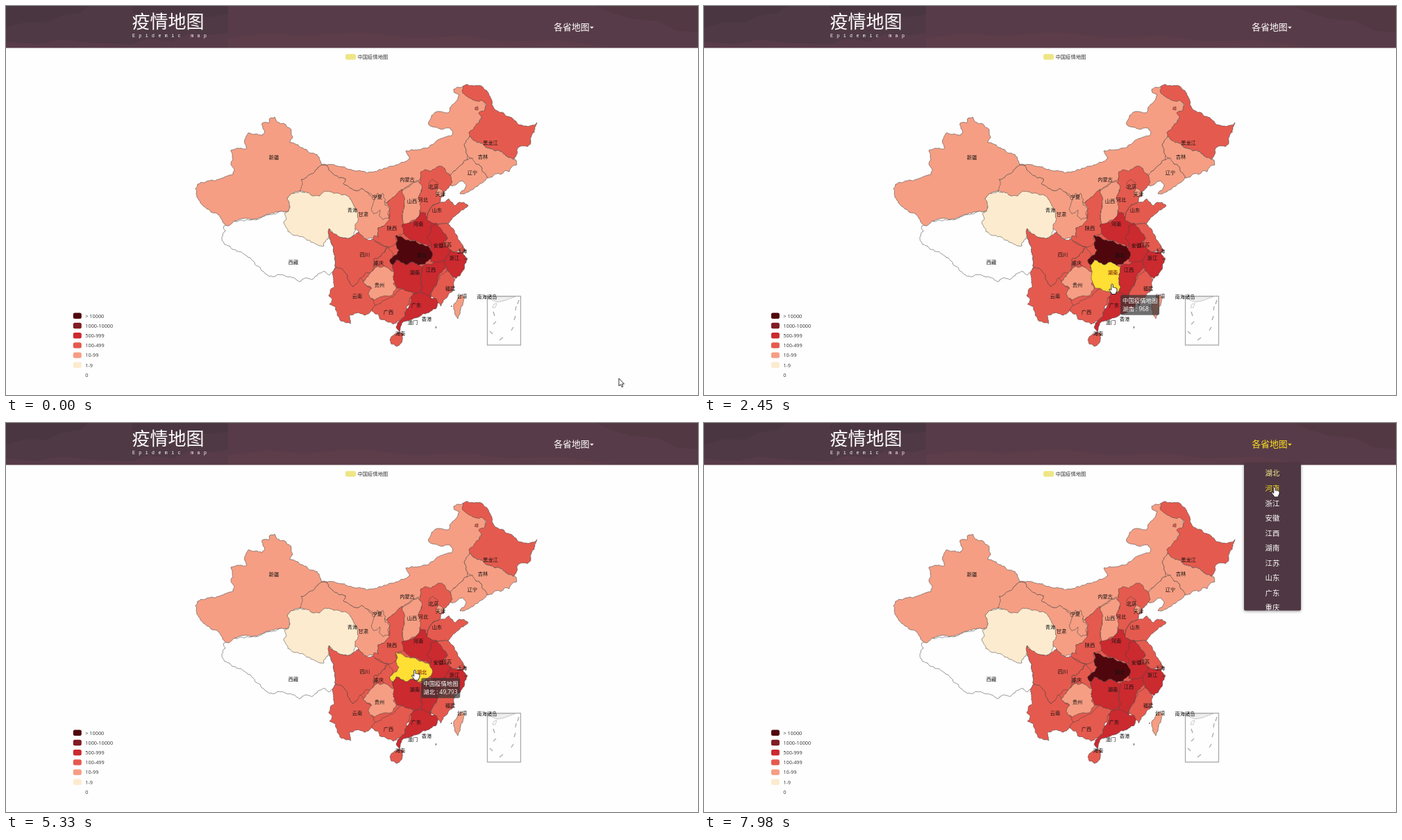
These frames come from a looping animation (997 px wide and 561 px high, 8 s). An HTML page:

```html
<!DOCTYPE html>
<html lang="zh-CN">
<head>
<meta charset="utf-8">
<title>疫情地图</title>
<style>
html, body { margin: 0; width: 100%; height: 100%; overflow: hidden; background: #fefefe; }
svg { display: block; width: 100vw; height: 100vh; font-family: "Open Sans", "Noto Sans CJK SC", "Noto Sans CJK", sans-serif; }
#map path { stroke: #444; stroke-width: .55; stroke-linejoin: round; }
#map .under { stroke: none; }
.none { fill: #fefefe; } .l1 { fill: #fdebcf; } .l2 { fill: #f59e83; } .l3 { fill: #e55a4e; }
.l4 { fill: #cb2a2f; } .l5 { fill: #811c24; } .l6 { fill: #4f070d; }
#map .hot { fill: #ffdf33; }
#labels text { font-size: 7.2px; text-anchor: middle; fill: #111; }
#labels .hot { fill: #640000; }
#inset { fill: none; stroke: #aaa; stroke-width: 1.3; }
.key { font-size: 7.3px; fill: #333; }
#tip text { font-size: 8.4px; fill: #fff; }
#menu text { font-size: 10.3px; text-anchor: middle; fill: #fff; letter-spacing: .2px; }
#menu rect { fill: #4f3843; filter: drop-shadow(0 1.5px 2px #0006); }
.pointer { fill: #fff; stroke: #111; stroke-width: .85; stroke-linejoin: round; }
</style>
</head>
<body>
<svg viewBox="0 0 997 561" preserveAspectRatio="none">
<defs><clipPath id="menuClip"><rect x="778" y="58" width="82" height="212.5"/></clipPath></defs>

<g id="header">
  <rect width="997" height="60.5" fill="#583b48"/>
  <path fill="#4e3944" d="M0 0H320V38L300 42 262 40 240 51 205 47 182 55 120 53 80 48 45 55 0 51Z"/>
  <path fill="#4a3641" d="M0 0H120L106 10 78 14 60 24 30 23 0 31ZM182 0H320V12L290 16 262 9 230 15 182 10Z"/>
  <path fill="#5d3d4a" d="M320 60V46L380 40 430 44 510 38 590 47 660 43 720 51 800 49 870 60Z"/>
  <path fill="#513843" d="M850 0H997V38L965 35 940 22 900 18 870 9Z"/>
  <text x="181.5" y="32" font-size="26" font-weight="300" fill="#fff">疫情地图</text>
  <text x="182" y="45" font-size="6.6" fill="#fff" letter-spacing="5.4" font-family="Liberation Mono, monospace">Epidemic map</text>
  <g id="nav" fill="#fff">
    <text y="34.6" font-size="12.9">各省地图</text>
    <path id="caret" d="M0 29.8h5.6l-2.8 3z"/>
  </g>
</g>

<rect x="489" y="69.2" width="15" height="8.4" rx="2.5" fill="#eee685"/>
<text class="key" x="506.5" y="76.2" font-size="7.2">中国疫情地图</text>
<g id="legend"></g>

<g id="map">
  <path class="under l2" d="430 255 470 245 560 240 640 200 665 195 690 210 690 240 660 238 600 250 550 320 510 330 500 290"/>
  <path class="under l3" d="480 345 530 340 560 282 600 252 630 250 625 290 632 330 645 356 640 382 620 418 590 430 550 445 500 430 485 400"/>
  <path class="none" d="314 317 329 310 355 308 403 296 420 310 462 330 466 335 472 348 474 362 475 377 471 383 466 388 460 383 452 385 442 394 432 392 423 398 415 392 406 391 398 387 388 390 378 389 371 383 360 374 348 362 334 354 326 351 322 346 315 344 311 333 316 325"/>
  <path class="l2" d="425 250 438 243 445 239 455 229 463 230 469 240 480 248 489 249 486 256 495 262 503 266 512 263 520 268 530 280 545 300 553 308 545 317 536 320 537 333 528 335 519 338 512 333 503 322 490 290 424 267"/>
  <path class="l2" d="273 264 276 257 287 254 300 252 314 247 327 243 329 236 324 228 327 222 324 208 333 205 347 205 344 198 349 183 357 185 369 187 372 179 369 169 378 169 380 162 387 160 390 166 403 171 411 178 413 190 409 197 421 200 434 208 448 214 452 222 455 229 445 239 438 243 425 250 427 257 424 267 416 268 406 276 408 282 407 296 400 297 390 297 379 301 366 305 355 308 344 306 329 310 319 317 311 308 305 300 295 297 288 291 281 285 276 277 274 271"/>
  <path class="l2" d="455 229 463 229 478 231 490 234 505 238 520 241 536 237 550 233 563 229 574 225 582 220 576 209 584 207 597 207 607 205 618 197 630 190 642 187 643 180 640 176 630 178 618 175 609 171 613 158 622 152 637 154 640 146 648 138 653 128 646 125 645 120 652 117 658 116 664 122 692 136 692 148 686 160 682 168 668 188 663 194 660 200 663 212 665 222 655 230 645 238 640 245 632 240 610 240 600 242 597 250 592 252 582 257 575 262 568 268 562 273 556 277 548 285 543 278 535 270 533 276 520 268 512 263 503 266 495 262 486 256 489 249 480 248 469 240 463 230"/>
  <path class="l1" d="405 277 410 271 424 267 432 268 440 273 452 274 460 267 468 268 478 270 487 272 496 279 503 290 507 297 508 307 505 313 503 322 501 330 494 335 484 334 474 331 470 326 466 321 465 333 461 338 458 346 452 346 441 341 428 333 416 331 406 325 400 312 404 307 402 298 407 296 408 285"/>
  <path class="l2" d="533 276 543 270 547 279 546 287 553 293 550 300 551 306 543 308 538 303 539 294 530 300 527 290"/>
  <path class="l3" d="658 116 665 113 675 115 686 116 693 122 698 132 700 142 705 150 714 153 721 159 731 163 738 171 750 173 765 168 762 178 758 185 756 195 751 203 740 203 736 208 735 216 732 221 722 217 714 210 705 209 696 205 686 198 674 194 668 188 667 182 675 174 682 168 685 160 681 154 690 150 692 143 686 136 676 137 668 133 660 127 657 122"/>
  <path class="l3" d="676 146 680 145 680 150 675 149"/>
  <path class="l2" d="668 188 674 194 686 198 696 205 705 209 714 210 722 217 732 221 735 222 736 229 728 233 725 239 718 238 712 243 705 242 700 247 693 248 688 240 685 232 677 228 670 219 663 212 660 200 663 194"/>
  <path class="l2" d="665 222 672 219 677 228 685 232 688 240 693 248 684 256 676 261 668 267 660 271 654 271 660 266 663 258 658 252 650 256 645 259 641 259 638 253 640 245 645 238 655 230"/>
  <path class="l3" d="597 240 605 236 613 238 623 231 630 233 634 240 641 246 643 254 638 262 632 267 631 274 626 277 626 282 616 286 612 291 608 297 607 305 598 307 597 297 596 285 594 275 599 266 596 258 597 250"/>
  <path class="l3" d="609 256 615 250 622 255 620 262 613 265 608 262"/>
  <path class="l2" d="622 262 626 264 630 268 628 274 622 273 620 267"/>
  <path class="l2" d="594 252 599 258 598 266 594 276 596 286 596 297 594 305 585 309 575 315 570 315 571 305 572 293 573 280 569 268 575 263 585 256"/>
  <path class="l3" d="570 264 573 274 574 285 572 295 571 308 572 315 579 319 576 327 570 330 562 331 563 340 557 346 550 347 543 345 537 341 530 338 531 331 537 333 536 320 545 317 552 309 553 293 549 283 556 277 562 272"/>
  <path class="l3" d="608 299 613 290 622 285 632 283 638 278 643 283 647 288 650 285 659 283 666 288 660 293 654 297 647 303 641 309 637 315 628 314 619 316 611 311 605 309"/>
  <path class="l4" d="605 299 607 309 613 313 620 313 623 318 613 320 614 330 622 335 624 341 617 347 610 347 602 343 593 339 582 337 575 331 572 320 570 316 580 313 590 309 596 303 597 298"/>
  <path class="l3" d="621 315 628 314 637 315 645 322 650 331 654 339 659 346 656 353 646 355 640 352 636 345 633 340 636 334 630 327 622 320"/>
  <path class="l4" d="612 317 620 314 627 322 633 329 636 336 630 341 635 347 640 352 637 360 633 366 622 371 612 368 609 352 613 345 607 335 612 325"/>
  <path id="浙江" class="l4" d="640 352 650 355 658 354 661 360 663 370 660 380 654 389 648 393 641 388 636 381 632 372 633 365 637 360"/>
  <path class="l3" d="653 351 659 347 662 353 656 355"/>
  <path class="l3" d="635 381 642 389 647 394 645 402 643 412 637 417 630 424 626 433 622 428 617 421 612 416 617 407 621 399 626 388"/>
  <path class="l4" d="600 376 608 372 620 369 632 367 634 377 628 384 623 390 620 402 613 412 612 420 604 421 598 415 600 406 598 396 598 386"/>
  <path class="l3" d="465 321 472 328 484 334 494 335 501 331 508 326 515 335 521 338 529 336 537 343 549 347 546 355 540 361 530 365 530 376 525 385 517 386 512 392 506 400 500 405 495 398 492 388 485 380 475 377 474 362 472 348 466 335"/>
  <path class="l3" d="471 383 475 377 485 380 492 388 495 398 500 405 506 400 510 392 515 398 520 404 527 408 523 416 530 425 534 433 526 440 516 446 505 443 495 446 497 458 488 456 481 453 477 445 475 434 466 430 470 423 465 418 467 411 473 405 472 393"/>
  <path class="l3" d="531 432 540 429 548 423 556 420 562 414 570 408 580 410 587 415 583 420 577 438 575 447 569 453 558 459 549 455 538 451 536 444 527 440"/>
  <path class="l2" d="519 392 525 385 530 380 538 375 545 375 551 378 560 381 562 393 558 400 562 408 556 417 546 418 537 421 530 424 522 416 527 407 519 403 515 398"/>
  <path class="l3" d="530 375 530 365 540 361 546 355 551 347 558 358 553 366 557 373 560 383 553 380 545 374 538 377"/>
  <path id="湖南" class="l4" d="557 373 562 366 568 369 576 373 585 369 594 374 600 376 598 386 598 396 600 406 597 412 588 414 580 412 572 408 563 406 558 395 559 385"/>
  <path id="湖北" class="l6" d="561 331 568 332 575 337 584 339 592 341 601 344 608 346 612 353 614 361 609 367 604 372 594 374 585 369 576 373 568 369 562 366 557 373 553 366 562 359 566 352 562 345 564 338"/>
  <path id="广东" class="l4" d="591 414 600 413 606 417 612 421 620 422 622 429 620 436 612 440 606 443 597 447 588 450 578 454 570 458 568 466 566 471 562 463 564 457 569 453 575 447 577 438 583 429 583 420 587 415"/>
  <path class="l3" d="556 476 566 471 573 474 571 482 563 491 556 488 553 482"/>
  <path class="l2" d="657 416 661 420 658 432 654 444 651 451 646 444 645 434 650 424"/>
  <path class="l4" d="660 365 664 363 664 367"/>
  <path class="l4" d="619 462 620 463 619 465"/>
  <path class="l3" d="641 433 642 432 642 434"/>
</g>

<g id="inset">
  <path fill="#eee" stroke-width=".6" d="M694 419L700 424 708 427 718 425 726 422 734 419Z"/>
  <rect x="693.5" y="418.5" width="48" height="70.5"/>
  <path d="M739 424l-2 6M735 433l-1 6M734 447l-2 6M731 463l-3 5M716 478l-5 4M701 473l-4-4M702 459l4-4M704 447l-2-6"/>
  <path stroke-width=".6" d="M701 435l2-5 4-1-2 6z"/>
</g>
<g id="labels"></g>

<g id="tip">
  <rect width="56" height="29" rx="2.4" fill="#323232" fill-opacity=".7"/>
  <text x="3" y="11.7">中国疫情地图</text>
  <text id="tipValue" x="3" y="23.5"></text>
</g>

<g id="menu">
  <rect x="778" y="58" width="82" height="212.5" rx="2"/>
  <g id="items" clip-path="url(#menuClip)"></g>
</g>

<path id="arrow" class="pointer" d="M0 0V11L2.5 8.7 4.3 12.6 6 11.8 4.4 8.1H7.6Z"/>
<path id="hand" class="pointer" d="M-1.2 1Q0-.9 1.2 1V5.3Q2.5 4.4 3.3 5.6 4.5 4.9 5.2 6.1 6.7 5.7 7 7.3V10.2L5.4 13.3V14.8H-.8V13.3L-4.2 9Q-4.6 7.2-3 7.6L-1.2 9.2Z"/>
</svg>

<script>
const LOOP = 8000;
const $ = id => document.getElementById(id);
const clamp = v => Math.max(0, Math.min(1, v));
const ramp = (t, from, to) => clamp((t - from) / (to - from));
const ease = p => p * p * (3 - 2 * p);

function add(parent, tag, attrs, text = '') {
  const el = document.createElementNS('http://www.w3.org/2000/svg', tag);
  for (const key in attrs) el.setAttribute(key, attrs[key]);
  el.textContent = text;
  return parent.appendChild(el);
}

// Splits an edge with an offset that depends only on its midpoint, so neighbours share borders.
function roughEdge(a, b) {
  const length = Math.hypot(b[0] - a[0], b[1] - a[1]);
  if (length < 3) return [b];
  const x = (a[0] + b[0]) / 2, y = (a[1] + b[1]) / 2, amp = Math.min(1.2, length * .15);
  const mid = [x + amp * Math.sin(x * 12.9 + y * 7.3), y + amp * Math.sin(x * 5.7 + y * 17.1)];
  return [...roughEdge(a, mid), ...roughEdge(mid, b)];
}

for (const path of document.querySelectorAll('#map path')) {
  const n = path.getAttribute('d').split(' ').map(Number), points = [];
  for (let i = 0; i < n.length; i += 2) points.push([n[i], n[i + 1]]);
  const edge = points.flatMap((p, i) => roughEdge(p, points[(i + 1) % points.length]));
  path.setAttribute('d', 'M' + edge.map(p => p.map(v => v.toFixed(1)).join(' ')).join('L') + 'Z');
}

const labels = {};
const places = '新疆 386 218,西藏 414 369,青海 499 294,甘肃 515 300,宁夏 535 275,内蒙古 578 250,黑龙江 698 197,' +
  '吉林 687 217,辽宁 672 240,北京 616 260,天津 626 271,河北 601 279,山西 585 281,山东 621 294,陕西 556 320,' +
  '河南 594 314,安徽 623 345.5,江苏 635 344,上海 657 353,浙江 646 363,湖北 599 359,四川 517 358,重庆 537 370,' +
  '湖南 589 384,江西 612 380,贵州 538 402,云南 506 418,广西 551 441,广东 591 431,福建 640 407,台湾 657 418,' +
  '香港 606 451,澳门 586 456,海南 568 472,南海诸岛 693 419';
for (const place of places.split(',')) {
  const [name, x, y] = place.split(' ');
  labels[name] = add($('labels'), 'text', { x, y: +y + 2.7 }, name);
}

['> 10000', '1000-10000', '500-999', '100-499', '10-99', '1-9', '0'].forEach((range, i) => {
  const y = 446.8 + i * 14.2;
  if (i < 6) add($('legend'), 'rect', { x: 96.8, y: y - 4.2, width: 12, height: 8.4, rx: 2.5, class: 'l' + (6 - i) });
  add($('legend'), 'text', { x: 114.3, y: y + 2.7, class: 'key' }, range);
});

const items = ['湖北', '河南', '浙江', '安徽', '江西', '湖南', '江苏', '山东', '广东', '重庆']
  .map((name, i) => add($('items'), 'text', { x: 819, y: 76.4 + i * 21.55 }, name));

// time, x, y of the pointer tip
const track = [
  [0, 883, 537], [70, 883, 537], [180, 876, 541], [400, 790, 526], [860, 609, 483], [1150, 603, 450],
  [1400, 599, 437], [1740, 598, 433], [1820, 598, 433], [2200, 593, 412], [2600, 585, 394],
  [2800, 580, 372], [2990, 577, 362], [3320, 577, 361], [3470, 579, 359], [4630, 579, 359],
  [5000, 584, 352], [5400, 590, 357], [5480, 594, 358], [5690, 660, 357], [5950, 860, 325],
  [6060, 908, 296], [6110, 902, 276], [6260, 839, 170], [6500, 830, 62], [6670, 832, 34],
  [6980, 832, 32], [7520, 832, 33], [7700, 829, 62], [7980, 822, 92], [LOOP, 822, 92]
];
function pointerAt(t) {
  const i = Math.max(1, track.findIndex(k => k[0] >= t));
  const [t0, x0, y0] = track[i - 1], [t1, x1, y1] = track[i], p = ramp(t, t0, t1);
  return [x0 + (x1 - x0) * p, y0 + (y1 - y0) * p];
}

const hovers = [
  { name: '广东', value: '794', from: 1190, to: 2200 },
  { name: '湖南', value: '968', from: 2200, to: 2790 },
  { name: '湖北', value: '49,793', from: 2790, to: 5560 },
  { name: '浙江', value: '925', from: 5600, to: 5690 }
];

const move = (el, x, y) => el.setAttribute('transform', `translate(${x} ${y})`);
const show = (el, on) => el.style.display = on ? '' : 'none';
const tint = (base, amount) => `color-mix(in srgb, #f8df20 ${amount * 100}%, ${base})`;

function draw(t) {
  const [x, y] = pointerAt(t);
  const hover = hovers.find(h => t >= h.from && t < h.to);
  for (const h of hovers) {
    $(h.name).classList.toggle('hot', h === hover);
    labels[h.name].classList.toggle('hot', h === hover);
  }

  const tipFor = hovers.findLast(h => t >= h.from && t < h.to + 100);
  show($('tip'), tipFor);
  if (tipFor) {
    const [tx, ty] = pointerAt(t - 80);
    move($('tip'), tx + 10.5, ty + 12.5);
    $('tipValue').textContent = `${tipFor.name} : ${tipFor.value}`;
  }

  const spread = 1.1 * (ease(ramp(t, 6600, 6960)) - ease(ramp(t, 7560, 7960)));
  const [navText, caret] = $('nav').children;
  navText.setAttribute('x', 789.2 - 2 * spread);
  navText.style.letterSpacing = spread + 'px';
  move(caret, 841.2 + 2 * spread, 0);
  $('nav').style.fill = tint('#fff', ramp(t, 6580, 6760));

  const opened = ramp(t, 7070, 7350);
  show($('menu'), opened > 0);
  $('menu').style.opacity = opened;
  items[0].style.fill = tint('#fff', ramp(t, 7700, 7850) - ramp(t, 7880, 8080));
  items[1].style.fill = tint('#fff', ramp(t, 7860, 7980));

  const pointing = Boolean(hover) || t >= 6600;
  show($('hand'), pointing);
  show($('arrow'), !pointing);
  move(pointing ? $('hand') : $('arrow'), x, y);
}

function frame() {
  draw(performance.now() % LOOP);
  requestAnimationFrame(frame);
}
frame();
</script>
</body>
</html>
```
